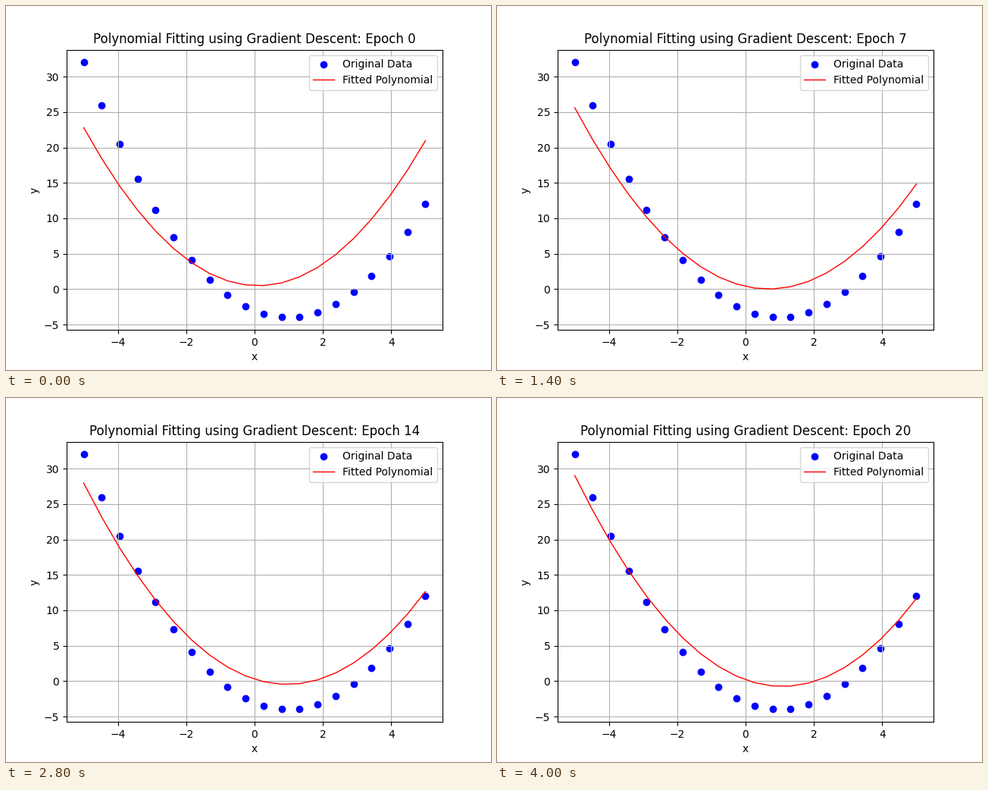
These frames come from a looping animation (640x480 px, 4200 ms). A matplotlib script:

```python
import numpy as np
import matplotlib.pyplot as plt
from matplotlib.animation import FuncAnimation

EPOCHS = 21
LEARNING_RATE = 0.01

x = np.linspace(-5, 5, 20)
y = x**2 - 2 * x - 3
features = np.vander(x, 3, increasing=True)


def train(weights):
    """Return the fitted curve after each gradient descent step."""
    curves = []
    for _ in range(EPOCHS):
        error = features @ weights - y
        weights = weights - LEARNING_RATE * features.T @ error / len(x)
        curves.append(features @ weights)
    return curves


curves = train(np.array([0.5, 0.0, 0.66]))

fig, ax = plt.subplots(figsize=(6.4, 4.8), dpi=100)
ax.scatter(x, y, color="blue", label="Original Data")
line, = ax.plot(x, curves[0], color="red", linewidth=1, label="Fitted Polynomial")
ax.set_xlabel("x")
ax.set_ylabel("y")
ax.legend(loc="upper right")
ax.grid(True)
title = ax.set_title("")


def update(epoch):
    line.set_ydata(curves[epoch])
    title.set_text(f"Polynomial Fitting using Gradient Descent: Epoch {epoch}")
    return line, title


anim = FuncAnimation(fig, update, frames=EPOCHS, interval=200, repeat=True, repeat_delay=0)
plt.show()
```
